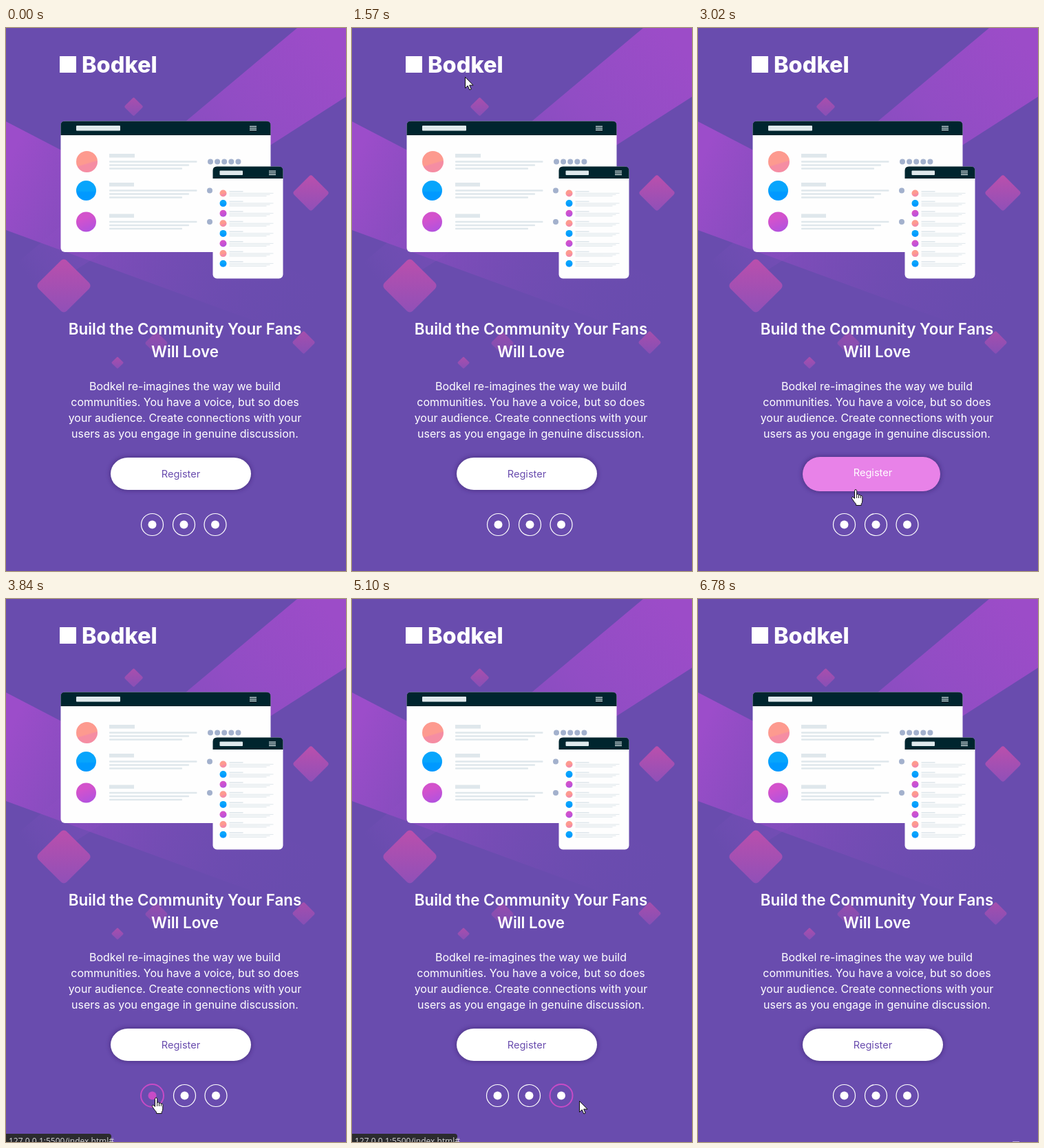
These frames come from a looping animation (494x790 px, 6910 ms). An HTML page:

```html
<!DOCTYPE html>
<html lang="en">
<head>
<meta charset="utf-8">
<title>Bodkel</title>
<style>
html, body { margin: 0; width: 100%; height: 100%; overflow: hidden; background: #694cae; }
svg { display: block; width: 494px; height: 790px; }
text { font-family: Inter, "Open Sans", sans-serif; fill: #fff; }
.mid { text-anchor: middle; }
.head { font-size: 22.4px; font-weight: 600; }
.body { font-size: 16px; }
</style>
</head>
<body>
<svg id="stage" viewBox="0 0 494 790">
  <defs>
    <linearGradient id="beam" gradientUnits="userSpaceOnUse" x1="470" y1="20" x2="40" y2="370">
      <stop offset="0" stop-color="#9c4cc8"/><stop offset=".3" stop-color="#914dc4"/>
      <stop offset=".95" stop-color="#6d4db1"/><stop offset="1" stop-color="#694cae"/>
    </linearGradient>
    <linearGradient id="sash" gradientUnits="userSpaceOnUse" x1="0" y1="200" x2="450" y2="420">
      <stop offset="0" stop-color="#9c4dca"/><stop offset="1" stop-color="#694cae" stop-opacity="0"/>
    </linearGradient>
    <linearGradient id="gem" x1="0" y1="0" x2="1" y2="1">
      <stop offset="0" stop-color="#bb4fac"/><stop offset="1" stop-color="#8f50b8"/>
    </linearGradient>
    <linearGradient id="c0" x1=".35" y1="0" x2=".65" y2="1">
      <stop offset=".55" stop-color="#fd9a8f"/><stop offset=".62" stop-color="#f58da3"/>
    </linearGradient>
    <linearGradient id="c1" x2="0" y2="1">
      <stop offset=".5" stop-color="#07a5fc"/><stop offset=".6" stop-color="#0099ff"/>
    </linearGradient>
    <linearGradient id="c2" x1=".3" y1="0" x2=".7" y2="1">
      <stop offset=".3" stop-color="#d352cc"/><stop offset="1" stop-color="#b052e0"/>
    </linearGradient>
    <filter id="soft" x="-20%" y="-50%" width="140%" height="200%"><feGaussianBlur stdDeviation="3.5"/></filter>
  </defs>
  <path fill="url(#beam)" d="M423 0H494V100L0 417V355Z"/>
  <path fill="url(#sash)" d="M0 136L494 393V475L0 294Z"/>
  <g id="gems"></g>
  <g id="mock"></g>
  <rect x="78" y="41" width="24" height="24" fill="#fff"/>
  <text x="110" y="65" font-size="32.5" font-weight="800">Bodkel</text>
  <g id="copy"></g>
  <rect id="shade" rx="24" fill="#2a1558" opacity=".6" filter="url(#soft)"/>
  <rect id="pill" rx="25"/>
  <text id="label" class="mid" x="254" font-size="14.6">Register</text>
  <g id="icons"></g>
  <g id="status">
    <path d="M0 778H149Q153 778 153 782V790H0Z" fill="#2b2b2e"/>
    <text x="4" y="793" style="font:12px 'Open Sans',sans-serif;fill:#d5d5d8">127.0.0.1:5500/index.html#</text>
  </g>
  <path id="arrow" d="M.5 .5V16.5L4.2 13L6.8 19L9.2 18L6.7 12.2H12Z" fill="#fff" stroke="#111"/>
  <path id="hand" d="M5.5 13.5V2.4Q5.5 .6 7 .6T8.7 2.4V8Q9.2 6.9 10.4 7.2T11.5 9Q12 7.8 13.2 8.2T14.3 10Q14.8 9 15.9 9.5T16.8 11.5V17Q16.8 19.8 15.2 21.5V23.5H7.6V21.5Q5 19 2.3 14.6Q.6 12.4 1.8 11.6Q3 11 4 12Z
    M8.7 8V13M11.5 9V13M14.3 10V13" fill="#fff" stroke="#111"/>
  <rect id="edge" x="457" y="789" width="10" height="1" rx=".5" fill="#b9a9d8"/>
</svg>
<script>
const $ = id => document.getElementById(id);
const NS = "http://www.w3.org/2000/svg";
function add(parent, tag, attrs, text) {
  const el = document.createElementNS(NS, tag);
  set(el, attrs);
  if (text) el.textContent = text;
  return parent.appendChild(el);
}
function set(el, attrs) { for (const k in attrs) el.setAttribute(k, attrs[k]); }
const show = (el, on) => el.style.display = on ? "" : "none";

// Diamonds: centre, half diagonal, opacity
for (const [x, y, r, o] of [[84, 375, 41, 1], [443, 240, 27, 1], [185.5, 114.5, 14, .8],
  [162, 487, 9, .8], [218.5, 458.5, 17, .55], [432.5, 457.5, 17, .75]]) {
  const s = r * Math.SQRT2;
  add($("gems"), "rect", { x: -s / 2, y: -s / 2, width: s, height: s, rx: r / 7, fill: "url(#gem)",
    opacity: o, transform: `translate(${x} ${y}) rotate(45)` });
}

// Product mock-ups
const mock = $("mock");
const bar = (x, y, w, h, fill = "#dfe7ec", rx = 0) => add(mock, "rect", { x, y, width: w, height: h, fill, rx });
const dot = (cx, cy, r, fill) => add(mock, "circle", { cx, cy, r, fill });
function panel(x, y, w, h, top) {
  bar(x, y, w, h, "#fefefe", 6);
  add(mock, "path", { fill: "#00252e", d: `M${x} ${y + top}V${y + 6}q0-6 6-6H${x + w - 6}q6 0 6 6V${y + top}Z` });
}
function burger(x, y) { for (let i = 0; i < 3; i++) bar(x, y + i * 2.6, 10, 1.2, "#e6eef0"); }

panel(79.5, 135.5, 305, 190.5, 20.5);
bar(102, 142, 64, 7.5, "#dfe9ec", 1);
burger(354, 142.6);
[[194.5, 183], [236.5, 225], [282, 270.5]].forEach(([y, top], i) => {
  dot(i ? 116.5 : 117.5, y, i ? 14.5 : 15.5, `url(#c${i})`);
  bar(150, top, i ? 36 : 37, 5.5);
  [127.5, 116, 106].forEach((w, j) => bar(150, top + 10.2 + j * 5, w, 2.5, "#dfe7ec", 1));
  for (let j = 0; j < 5; j++) dot((i ? 296 : 297) + j * 10.1, y, 4, "#a3b1cd");
});

panel(300.5, 201.5, 102, 163, 17.5);
bar(310.5, 207.5, 33.5, 6.5, "#dfe9ec", 1);
burger(382, 207.6);
for (let i = 0; i < 8; i++) {
  const y = 240.5 + i * 14.6;
  dot(315.5, y, 5, `url(#c${i % 3})`);
  bar(324.5, y - 3.5, 20, 1.6);
  [64, 59, 54].forEach((w, j) => bar(324.5, y - .6 + j * 2, w, 1));
}

// Copy
const line = (s, y, cls) => add($("copy"), "text", { x: 260, y, class: "mid " + cls }, s);
["Build the Community Your Fans", "Will Love"].forEach((s, i) => line(s, 446 + i * 33, "head"));
["Bodkel re-imagines the way we build", "communities. You have a voice, but so does",
  "your audience. Create connections with your", "users as you engage in genuine discussion."]
  .forEach((s, i) => line(s, 527 + i * 23, "body"));

const icons = [212.5, 258.5, 304].map(x => ({
  x,
  ring: add($("icons"), "circle", { cy: 722.5, fill: "none" }),
  mark: add($("icons"), "circle", { cy: 722.5, r: 6 })
}));

// Pointer path: time, x, y
const path = [
  [460, 447, 752], [640, 412, 553], [720, 403, 482], [930, 357, 287], [1150, 284, 106],
  [1220, 252, 88], [1430, 172, 46], [1570, 164, 70], [1650, 160, 125], [1850, 144, 282],
  [1920, 131, 330], [2100, 113, 430], [2300, 130, 560], [2500, 178, 645], [2700, 200, 655],
  [3020, 222, 671], [3150, 226, 681], [3350, 226, 709], [3520, 214, 722], [3840, 211, 725],
  [4120, 213, 727], [4400, 254, 728], [4750, 298, 728], [4880, 310, 727], [5100, 330, 730],
  [5300, 359, 739], [5580, 356, 738], [5720, 316, 725], [5860, 303, 722], [6210, 307, 724],
  [6300, 322, 727], [6420, 358, 745], [6640, 430, 772], [6780, 430, 772]
];
function pointer(t) {
  const i = Math.max(1, path.findIndex(p => p[0] >= t));
  const [a, b] = [path[i - 1], path[i]];
  const k = (t - a[0]) / (b[0] - a[0]);
  return [a[1] + (b[1] - a[1]) * k, a[2] + (b[2] - a[2]) * k];
}
const within = (t, a, b) => t >= a && t < b;

// Icon hovers: icon, ring start, ring end, thick from, pointer leaves
const hovers = [[0, 3500, 4260, 3570, 4260], [1, 4300, 4560, 4370, 4560],
  [2, 4600, 5180, 4670, 5030], [2, 5790, 6320, 5930, 6300]];
const PINK = "#c74bc6";

function draw(t) {
  const moving = within(t, 460, 6780);
  const over = within(t, 2480, 3150);
  const hover = hovers.find(h => within(t, h[1], h[2]));
  const thick = hover && t >= hover[3];
  const hand = over || hover && t < hover[4];

  const box = over ? { x: 152, y: 624, width: 200, height: 50 } : { x: 152, y: 625, width: 204, height: 47 };
  set($("pill"), { ...box, fill: over ? "#e882e8" : "#fff" });
  set($("shade"), box);
  set($("label"), { y: over ? 652 : 653.5 });
  $("label").style.fill = over ? "#fff" : "#694cae";

  icons.forEach(({ x, ring, mark }, i) => {
    const hot = hover && hover[0] === i;
    const cx = x + (thick ? Math.sign(i - hover[0]) : 0);
    set(ring, { cx, r: hot && thick ? 16.5 : 16, stroke: hot ? PINK : "#fff", "stroke-width": hot && thick ? 2 : 1.2 });
    set(mark, { cx, fill: hot && t < hover[4] ? PINK : "#fff" });
  });

  show($("status"), within(t, 3560, 5300) || within(t, 5790, 6420));
  show($("arrow"), moving && !hand);
  show($("hand"), moving && hand);
  show($("edge"), t >= 6780);
  if (moving) {
    const [x, y] = pointer(t);
    set($(hand ? "hand" : "arrow"), { transform: `translate(${Math.round(x)} ${Math.round(y)})` });
  }
}

const start = performance.now();
function tick(now) {
  draw(Math.max(0, now - start) % 6910);
  requestAnimationFrame(tick);
}
draw(0);
requestAnimationFrame(tick);
</script>
</body>
</html>
```
